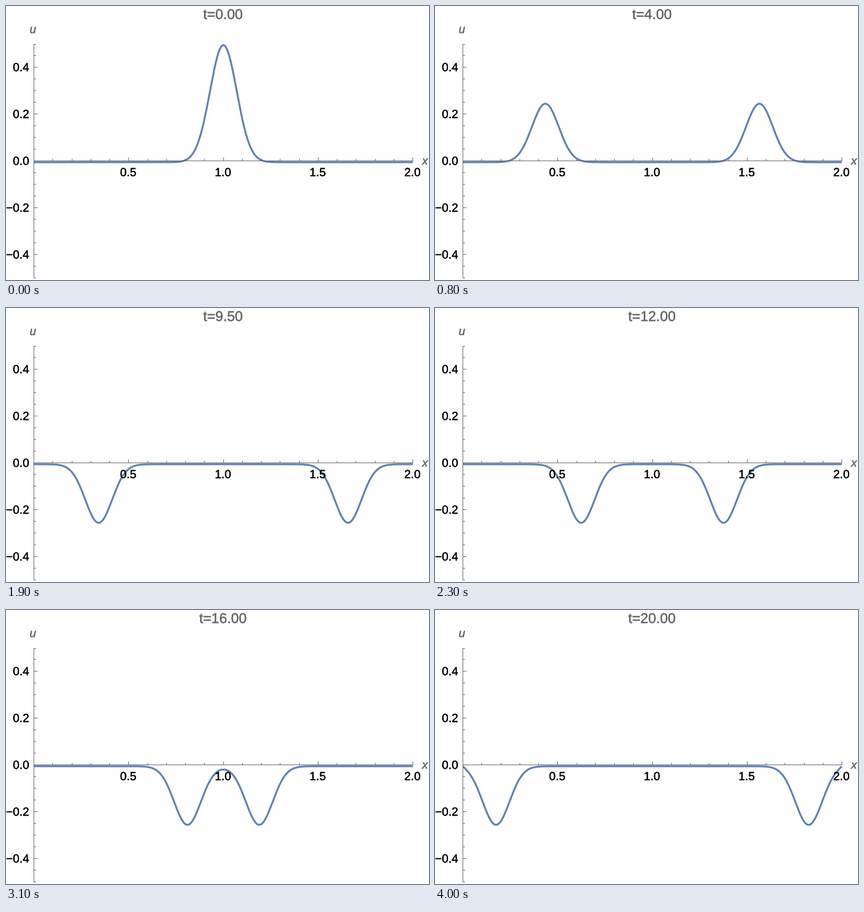
A matplotlib script for the animation above (4100 ms loop, 720 by 468 pixels).

```python
import math

import matplotlib.pyplot as plt
import numpy as np
from matplotlib.animation import FuncAnimation
from matplotlib.patheffects import withStroke

W, H, DPI = 720, 468, 100
PX = 72 / DPI                      # points per pixel
FRAMES, INTERVAL, DT = 41, 100, 0.5
SPEED, SHARPNESS = 0.14125, 100
GRAY, BLUE = "#666666", "#5E81B5"

plt.rcParams["font.family"] = "Liberation Sans"
plt.rcParams["text.hinting"] = "none"

fig = plt.figure(figsize=(W / DPI, H / DPI), dpi=DPI, facecolor="white")
ax = fig.add_axes([0, 0, 1, 1])
ax.set_xlim(0, W)
ax.set_ylim(H, 0)
ax.axis("off")


def axis_x(x):
    return 47.5 + 322.5 * x


def axis_y(u):
    return 264.5 - 400 * u


def pixel(v):
    """Centre of the pixel that holds v."""
    return math.floor(v + 1e-6) + 0.5


def rule(x0, y0, x1, y1):
    ax.plot([x0, x1], [y0, y1], color=GRAY, lw=PX, zorder=3,
            solid_capstyle="butt", snap=False)


def label(x, y, text, size=20, color="black", ha="center", **kw):
    # The thin outline gives the slightly heavier smoothed type.
    return ax.text(x, y, text, fontsize=size * PX, color=color, ha=ha,
                   va="baseline", zorder=4,
                   path_effects=[withStroke(linewidth=0.35 * PX,
                                            foreground=color)], **kw)


def draw_axes():
    left, base, top = axis_x(0), axis_y(0), 65.5
    rule(left - 0.5, base, axis_x(2) + 0.5, base)
    rule(left, top - 0.5, left, axis_y(-0.5) + 0.5)
    for i in range(1, 21):
        major = i % 5 == 0
        x = pixel(axis_x(i / 10))
        rule(x, base, x, base - (6 if major else 3.5))
        if major:
            label(axis_x(i / 10) - 0.7, 290.6, f"{i / 10:.1f}")
    for i in range(-10, 11):
        major = i % 4 == 0
        y = max(pixel(axis_y(i / 20)), top)
        rule(left, y, left + (6 if major else 3.5), y)
        if major:
            text = f"{i / 20:.1f}".replace("-", "\u2212")
            label(39.5, axis_y(i / 20) + 6.8, text, ha="right")
    label(45.8, 46.2, "u", color=GRAY, style="italic")
    label(713.2, 271, "x", color=GRAY, style="italic")


def pulse(x):
    """Odd, 4-periodic extension of the starting bump, fixed at both ends."""
    x = np.mod(x, 4)
    return 0.5 * (np.exp(-SHARPNESS * (x - 1) ** 2)
                  - np.exp(-SHARPNESS * (x - 3) ** 2))


def wave(x, t):
    return (pulse(x - SPEED * t) + pulse(x + SPEED * t)) / 2


def clock(t):
    # Two significant digits, padded to two decimals.
    shown = math.floor(t + 0.5) if t >= 10 else t
    return f"t={shown:.2f}"


draw_axes()
xs = np.linspace(0, 2, 600)
curve, = ax.plot([], [], color=BLUE, lw=3.2 * PX, zorder=2, snap=False,
                 solid_capstyle="butt", solid_joinstyle="round")
title = label(369.3, 22.2, "", size=24, color=GRAY)


def update(i):
    t = i * DT
    curve.set_data(axis_x(xs), axis_y(wave(xs, t)) + 2.4)
    title.set_text(clock(t))
    return curve, title


anim = FuncAnimation(fig, update, frames=FRAMES, interval=INTERVAL,
                     repeat=True, repeat_delay=0, blit=False)
plt.show()
```
